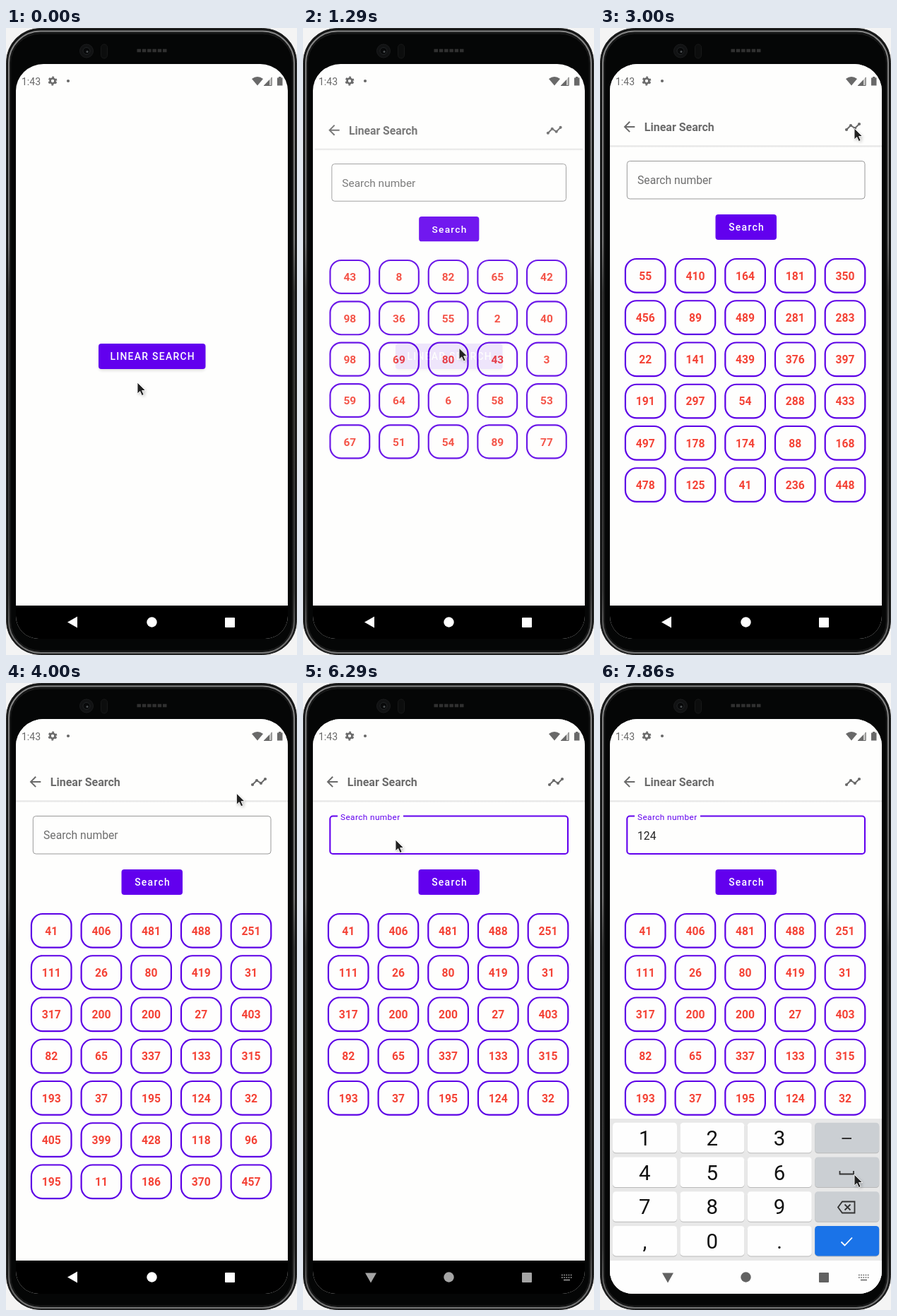
Animation, 412 px wide and 888 px high, one loop 8000 ms. Source, as an HTML page:

```html
<!DOCTYPE html>
<html lang="en">
<head>
<meta charset="utf-8">
<title>Linear search demo</title>
<style>
  html, body { margin: 0; width: 100%; height: 100%; overflow: hidden; background: #f4f4f4; }
  svg { display: block; width: 100vw; height: 100vh; font-family: Roboto, sans-serif; }
  .mid { text-anchor: middle; }
  .button { fill: #6200ee; }
  .caps { fill: #fff; font-size: 13.9px; font-weight: 500; letter-spacing: 1.3px; }
  .cell rect { fill: none; stroke: #5c00e6; stroke-width: 2.2; }
  .cell text { fill: #f44336; font-size: 15.7px; font-weight: 700; text-anchor: middle; }
  .key text { fill: #111; font-size: 29.4px; text-anchor: middle; }
  .line { fill: none; stroke: #333; stroke-width: 1.8; }
</style>
</head>
<body>
<svg viewBox="0 0 412 888">
  <defs>
    <clipPath id="screen"><path d="M14 89A39 38 0 0 1 53 51H360A39 38 0 0 1 399 89V833A32 32 0 0 1 367 865H46A32 32 0 0 1 14 833Z"/></clipPath>
    <linearGradient id="rim" x2="0" y2="1">
      <stop offset="0" stop-color="#858585"/><stop offset=".34" stop-color="#777"/>
      <stop offset=".42" stop-color="#383838"/><stop offset=".9" stop-color="#3c3c3c"/><stop offset="1" stop-color="#777"/>
    </linearGradient>
    <linearGradient id="barShadow" x2="0" y2="1">
      <stop offset="0" stop-color="#dcdcdc"/><stop offset="1" stop-color="#fefefd"/>
    </linearGradient>
    <filter id="soft" x="-20%" y="-50%" width="140%" height="220%"><feGaussianBlur stdDeviation="2"/></filter>
  </defs>

  <rect width="412" height="888" fill="#f4f4f4"/>
  <g id="phone">
    <rect x=".5" y=".5" width="411" height="887" rx="48" fill="#131414" stroke="#2b2b2b"/>
    <rect x="4" y="4.500" width="404" height="880.500" rx="45" fill="none" stroke="url(#rim)" stroke-width="2"/>
    <rect x="6.500" y="8" width="399" height="874" rx="42" fill="#050606" stroke="#1c1c1c"/>
    <circle cx="114" cy="32.500" r="9.500" fill="#111213" stroke="#1b1c1d"/>
    <circle cx="114" cy="32.500" r="5" fill="#08090a" stroke="#222526"/>
    <circle cx="115" cy="33.500" r="1.500" fill="#4c5052"/>
    <rect x="134.500" y="23" width="9" height="20" rx="4.500" fill="#0c0d0d" stroke="#171818"/>
    <path d="M185.500 32H228" stroke="#303030" stroke-width="4.500" stroke-dasharray="5.500 1.800"/>
  </g>

  <g clip-path="url(#screen)">
    <rect x="14" y="51" width="385" height="814" fill="#fefefd"/>

    <g id="home">
      <rect id="lift" x="132" y="450" width="149.500" height="35" rx="4" filter="url(#soft)"/>
      <rect class="button" x="131" y="447" width="151.500" height="36" rx="4"/>
      <text class="caps mid" x="207.700" y="470.200">LINEAR SEARCH</text>
    </g>

    <g id="page">
      <rect x="14" y="51" width="385" height="767" fill="#fefefd"/>
      <rect x="14" y="166.500" width="385" height="3" fill="url(#barShadow)"/>
      <path transform="translate(29.700 128.200) scale(.98)" fill="#6a6a6a" d="M20 11H7.830l5.590-5.590L12 4l-8 8 8 8 1.410-1.410L7.830 13H20z"/>
      <text x="62.800" y="146" font-size="16" font-weight="700" fill="#6b6b6b">Linear Search</text>
      <g fill="#696969">
        <path d="M349 144L355 138L361 142L367 136" fill="none" stroke="#696969" stroke-width="2"/>
        <circle cx="349" cy="144" r="2.100"/><circle cx="355" cy="138" r="2.100"/>
        <circle cx="361" cy="142" r="2.100"/><circle cx="367" cy="136" r="2.100"/>
      </g>
      <rect id="field" x="38.300" y="188.500" width="336.700" height="53.500" rx="4" fill="none"/>
      <rect id="notch" x="49" y="186" height="5" fill="#fefefd"/>
      <text id="label" x="53">Search number</text>
      <text id="typed" x="53" y="222" font-size="15.700" fill="#222"></text>
      <rect id="caret" y="205" width="2" height="22" fill="#6200ee"/>
      <rect class="button" x="163.500" y="264" width="86.500" height="36" rx="4"/>
      <text class="caps mid" x="207.600" y="287.200">Search</text>
      <g id="cells"></g>
    </g>

    <g fill="#696969">
      <text x="22" y="80.500" font-size="14">1:43</text>
      <g fill="none" stroke="#696969">
        <circle cx="66" cy="75" r="3.500" stroke-width="2.700"/>
        <circle cx="66" cy="75" r="5.400" stroke-width="2" stroke-dasharray="2.800 2.855" stroke-dashoffset="-1.430"/>
      </g>
      <circle cx="88" cy="75" r="2.100"/>
      <path d="M348 72Q356 66 364 72L356 81.500Z"/>
      <path d="M365 81.500L377 69V81.500Z" opacity=".35"/><path d="M365 81.500L373 73.200V81.500Z"/><path d="M376 70V81.500H365" fill="none" stroke="#696969"/>
      <path d="M384 70.500H386V69H389.500V70.500H391.500V81.500H384Z"/>
    </g>

    <g id="keyboard">
      <rect x="14" y="617" width="385" height="250" fill="#e8e8e8"/>
      <g id="keys"></g>
      <path class="line" d="M342.500 645H356M339.500 691V695.500H359V691" stroke-width="2"/>
      <path class="line" d="M343 734.500H360.500V750.500H343L337 742.500ZM346.500 738.500L354.500 746.500M354.500 738.500L346.500 746.500"/>
      <path class="line" style="stroke:#fff" d="M341.500 791.500L346.500 796.500L357 785.500"/>
    </g>

    <rect id="bar" x="14" y="818" width="385" height="48"/>
    <g id="nav">
      <path id="back" d="M87 841.500L101 833.500V849.500Z"/>
      <circle cx="206.500" cy="841.500" r="7.200"/>
      <rect x="310" y="835" width="14" height="14" rx="1"/>
      <g id="switcher">
        <path d="M366 838.500H381M366 842H381" fill="none" stroke-width="1.700" stroke-dasharray="1.700 1.500"/>
        <path d="M369 845.500H378" fill="none" stroke-width="1.500"/>
      </g>
    </g>
  </g>

  <g id="pointer">
    <path d="M1 2V18L5 14.500 8 20 11 18.500 8.500 13.500H13Z" opacity=".25" filter="url(#soft)"/>
    <path d="M0 0V16L3.700 12.600L6.400 18.600L9.200 17.300L6.600 11.500H11.600Z" fill="#222" stroke="#fff" stroke-width=".9"/>
  </g>
</svg>

<script>
const STEPS = 56, LOOP = 8000;
const PURPLE = '#6200ee';
const el = id => document.getElementById(id);
const set = (node, attrs) => { for (const k in attrs) node.setAttribute(k, attrs[k]); };
const grey = v => `rgb(${v},${v},${v})`;

function add(parent, tag, attrs, text = '') {
  const node = document.createElementNS('http://www.w3.org/2000/svg', tag);
  set(node, attrs);
  node.textContent = text;
  return parent.appendChild(node);
}

// Linear track: rows of [step, ...values].
function track(rows, n) {
  const i = rows.findIndex(r => r[0] > n);
  if (i < 0) return rows[rows.length - 1].slice(1);
  if (i === 0) return rows[0].slice(1);
  const a = rows[i - 1], b = rows[i], p = (n - a[0]) / (b[0] - a[0]);
  return a.slice(1).map((v, k) => v + (b[k + 1] - v) * p);
}

const short = [43, 8, 82, 65, 42, 98, 36, 55, 2, 40, 98, 69, 80, 43, 3,
  59, 64, 6, 58, 53, 67, 51, 54, 89, 77];
const medium = [55, 410, 164, 181, 350, 456, 89, 489, 281, 283, 22, 141, 439, 376, 397,
  191, 297, 54, 288, 433, 497, 178, 174, 88, 168, 478, 125, 41, 236, 448];
const long = [41, 406, 481, 488, 251, 111, 26, 80, 419, 31, 317, 200, 200, 27, 403,
  82, 65, 337, 133, 315, 193, 37, 195, 124, 32, 405, 399, 428, 118, 96, 195, 11, 186, 370, 457];

const pointerPath = [[0, 186, 502], [7, 205, 466], [8, 205, 466], [11, 253, 428], [16, 360, 142],
  [27, 360, 142], [34, 125, 241], [35, 131, 222], [50, 131, 222], [55, 360, 696]];
const pageIn = [[7, .85, 0], [8, .92, .35], [9, .985, .9], [10, 1, 1]];
const labelRise = [[37, 0], [39, 1]];
const backTurn = [[41, 0], [44, -90]];
const keyboardDrop = [[44, 250], [45, 150], [46, 40], [47, 0]];
const barTone = [[44, 0], [45, 100], [46, 215], [47, 254]];
const iconTone = [[41, 255], [44, 165], [47, 98]];

const cells = long.map((_, i) => {
  const x = 64.2 + i % 5 * 70.7, y = 350.8 + Math.floor(i / 5) * 59.25;
  const g = add(el('cells'), 'g', { class: 'cell' });
  add(g, 'rect', { x: x - 28.3, y: y - 23.8, width: 56.6, height: 47.6, rx: 16 });
  return { g, text: add(g, 'text', { x, y: y + 5.9 }) };
});

[...'123–456 789 ,0. '].forEach((char, i) => {
  const col = i % 4, row = Math.floor(i / 4);
  const x = 18 + col * 95.4, y = 622.8 + row * 48.7;
  const fill = col < 3 ? '#fefefe' : row < 3 ? '#cbcfd3' : '#1a73e8';
  const g = add(el('keys'), 'g', { class: 'key' });
  add(g, 'rect', { x, y: y + 1, width: 91, height: 42.5, rx: 4.5, fill: '#b9b9b9' });
  add(g, 'rect', { x, y, width: 91, height: 42.5, rx: 4.5, fill });
  if (col < 3) add(g, 'text', { x: x + 45.3, y: y + 32 }, char);
});

function draw(n) {
  const [px, py] = track(pointerPath, n);
  set(el('pointer'), { transform: `translate(${px} ${py})` });

  const [scale, alpha] = track(pageIn, n);
  set(el('home'), { visibility: n < 10 ? 'visible' : 'hidden' });
  set(el('lift'), { opacity: n < 5 ? .14 : .3 });
  set(el('page'), {
    opacity: alpha,
    transform: `translate(206.5 458) scale(${scale}) translate(-206.5 -458)`
  });

  const values = n < 21 ? short : n < 27 ? medium : long;
  const count = n < 43 ? values.length : 25;
  cells.forEach(({ g, text }, i) => {
    set(g, { display: i < count ? 'inline' : 'none' });
    text.textContent = values[i] ?? '';
  });

  const [rise] = track(labelRise, n);
  const focused = rise > 0;
  set(el('field'), { stroke: focused ? PURPLE : '#999', 'stroke-width': focused ? 2.1 : 1 });
  set(el('notch'), { width: 93 * rise });
  set(el('label'), {
    y: 221 - 27 * rise,
    fill: focused ? PURPLE : '#6e6e6e',
    'font-size': 15.7 - 3.9 * rise,
    'letter-spacing': .4 * rise
  });

  const typed = '124'.slice(0, n < 47 ? 0 : n < 49 ? 1 : n < 50 ? 2 : 3);
  el('typed').textContent = typed;
  set(el('caret'), {
    x: 53 + typed.length * 8.8,
    opacity: (n >= 39 && n < 41) || (n >= 45 && n < 54) ? 1 : 0
  });

  set(el('keyboard'), {
    transform: `translate(0 ${track(keyboardDrop, n)})`,
    display: n < 45 ? 'none' : 'inline'
  });
  const tone = grey(Math.round(track(iconTone, n)[0]));
  set(el('bar'), { fill: grey(Math.round(track(barTone, n)[0])) });
  set(el('nav'), { fill: tone });
  set(el('back'), { transform: `rotate(${track(backTurn, n)} 95.5 841)` });
  set(el('switcher'), { stroke: tone, display: n < 43 ? 'none' : 'inline' });
}

let last = -1;
function tick() {
  const n = Math.floor((performance.now() % LOOP + 4) / LOOP * STEPS) % STEPS;
  if (n !== last) draw(last = n);
  requestAnimationFrame(tick);
}
tick();
</script>
</body>
</html>
```
